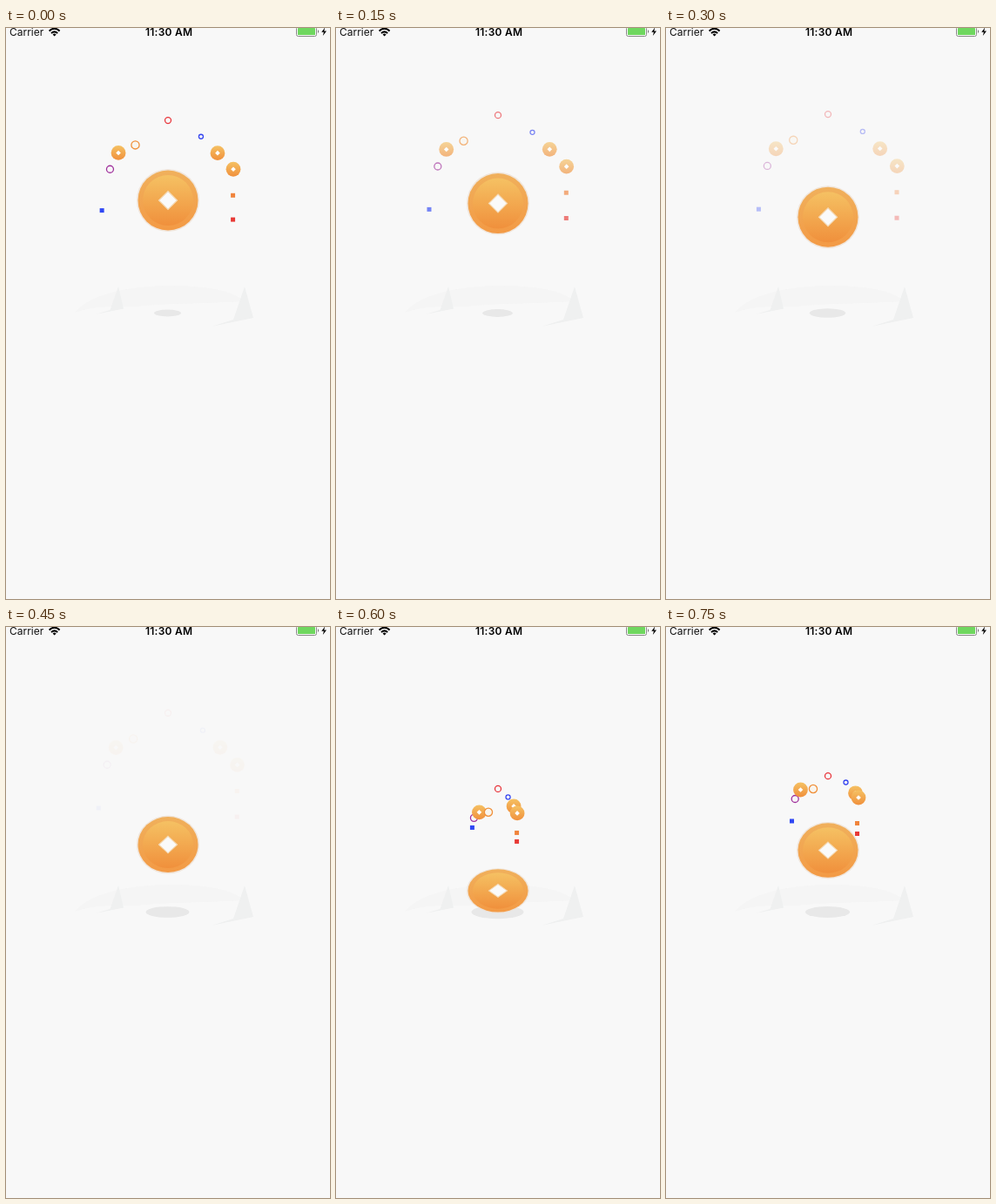
An HTML page for the animation above (0.89 s loop, 372x656 px).

```html
<!DOCTYPE html>
<html lang="en">
<head>
<meta charset="utf-8">
<title>Bouncing coin</title>
<style>
  html, body { margin: 0; width: 100%; height: 100%; overflow: hidden; background: #f8f8f8; }
  svg { display: block; width: 100%; height: 100%; }
  text { font: 12px Inter, "Liberation Sans", sans-serif; fill: #111; }
  .clock { font-weight: 600; letter-spacing: .25px; fill: #000; }
</style>
</head>
<body>
<svg viewBox="0 0 372 656">
  <defs>
    <linearGradient id="rim" x1="0" y1="0" x2="0" y2="1">
      <stop offset="0" stop-color="#f0b05c"/>
      <stop offset="1" stop-color="#f39a45"/>
    </linearGradient>
    <linearGradient id="face" x1="0" y1="0" x2="0" y2="1">
      <stop offset="0" stop-color="#f5c163"/>
      <stop offset="1" stop-color="#f0903c"/>
    </linearGradient>
    <g id="mini">
      <circle r="8.4" fill="url(#face)"/>
      <path d="M0-2.8 2.8 0 0 2.8-2.8 0Z" fill="#fff"/>
    </g>
  </defs>

  <rect width="372" height="656" fill="#f8f8f8"/>

  <!-- status bar -->
  <text x="4" y="8.8">Carrier</text>
  <g fill="none" stroke="#000" stroke-width="2">
    <path d="M49.6 3.4Q55.6-2 61.6 3.4"/>
    <path d="M52 6Q55.6 2.8 59.2 6"/>
  </g>
  <path d="M53.6 7.4Q55.6 5.8 57.6 7.4L55.6 9.5Z"/>
  <text class="clock" x="187.1" y="8.8" text-anchor="middle">11:30 AM</text>
  <rect x="333.5" y="-1.5" width="23" height="11" rx="2" fill="none" stroke="#888"/>
  <rect x="335" y="0" width="20" height="8" rx=".6" fill="#6fd75f"/>
  <path d="M358 2Q360.4 4 358 6Z" fill="#777"/>
  <path d="M366.2-.5 362.2 4.8H364.9L363.8 9 368 3.5H365.2Z"/>

  <!-- ground -->
  <path d="M79 327C98 303 150 296 190 296C230 296 262 302 273 314C235 317 185 316 150 320C125 320 100 319 79 327Z" fill="#f5f5f5"/>
  <path d="M129 297 135 322.5 102 329 119.5 324Z" fill="#eff0f0"/>
  <path d="M274 297 284 333 236 343 261 335Z" fill="#eff0f0"/>

  <ellipse id="shadow" cx="185.5" cy="327.5" fill="#e8e8e8"/>
  <g id="bits"></g>
  <g id="coin">
    <circle r="36" fill="#eedfd0" opacity=".75"/>
    <circle r="34.5" fill="url(#rim)"/>
    <circle r="29" fill="url(#face)"/>
    <path d="M0-10.5 10.5 0 0 10.5-10.5 0Z" fill="#fafafa" stroke="#f4d9b4" stroke-width="1.2"/>
  </g>
</svg>
<script>
const LOOP = 890, HIT = 600, FADE = 475;
const $ = id => document.getElementById(id);
const coin = $('coin'), shadow = $('shadow'), layer = $('bits');

function make(tag, attrs) {
  const el = document.createElementNS('http://www.w3.org/2000/svg', tag);
  for (const k in attrs) el.setAttribute(k, attrs[k]);
  layer.append(el);
  return el;
}
const ring = (r, stroke, fill = 'none') =>
  make('circle', { r, stroke, fill, 'stroke-width': 1.3 });
const square = fill => make('rect', { x: -2.5, y: -2.5, width: 5, height: 5, fill });
const mini = () => make('use', { href: '#mini' });

// Each bit: element, then x,y at launch, mid-flight and rest
const bits = [
  [ring(4, '#a0309c'), 158.5, 219.5, 148.2, 197.5, 116, 158],
  [mini(), 164.5, 213, 154.5, 187, 126, 138.2],
  [ring(4.6, '#f0903a', '#f9f5ee'), 175, 213, 169, 186, 146, 128.2],
  [ring(3.5, '#e8343a'), 186, 186, 186, 171.2, 186, 98.3],
  [ring(2.5, '#3444f0'), 197.5, 195.5, 206.5, 178.5, 226, 118.3],
  [mini(), 204, 206, 217.5, 190.8, 246, 138],
  [mini(), 208, 214, 221, 196, 265.8, 158.2],
  [square('#3048f4'), 156.5, 230.5, 144.5, 223, 106, 208],
  [square('#f0843c'), 207.5, 236.5, 219.5, 225.5, 265.5, 188.3],
  [square('#e83a36'), 207.5, 246.5, 219.5, 237.5, 265.5, 218]
];

const mix = (a, b, k) => a + (b - a) * k;

function drawCoin(t) {
  const fall = t / HIT, rise = (t - HIT) / (LOOP - HIT);
  const drop = t < HIT ? fall ** 2.46 : 1 - rise ** 1.25;
  const spread = t < HIT ? fall ** 1.5 : 1 - rise ** 1.8;
  const y = 198 + 105 * drop;
  const squash = 1 - 0.01567 * Math.max(0, y - 217) ** 1.45 / 35;
  const rx = 15.5 + 14.5 * spread;
  coin.setAttribute('transform', `translate(186 ${y}) scale(1 ${squash})`);
  shadow.setAttribute('rx', rx);
  shadow.setAttribute('ry', rx * 0.255);
}

function drawBits(t) {
  const launched = t >= HIT - 5;
  const age = launched ? Math.max(0, t - HIT) : t + LOOP - HIT;
  const first = Math.min(1, age / 150);
  const late = Math.max(0, age - 150) / 140;
  const out = 1 - 1 / (1 + 8.2 * late ** 2.1);
  layer.setAttribute('visibility', launched || t < FADE ? 'visible' : 'hidden');
  const alpha = launched ? 1 : Math.max(0, 1 - t / FADE) ** 1.1;
  for (const [el, x0, y0, x1, y1, x2, y2] of bits) {
    const x = mix(mix(x0, x1, first), x2, out);
    const y = mix(mix(y0, y1, first), y2, out);
    el.setAttribute('transform', `translate(${x} ${y})`);
    el.setAttribute('opacity', alpha);
  }
}

const start = performance.now();
function tick() {
  const t = (performance.now() - start) % LOOP;
  drawCoin(t);
  drawBits(t);
  requestAnimationFrame(tick);
}
tick();
</script>
</body>
</html>
```
